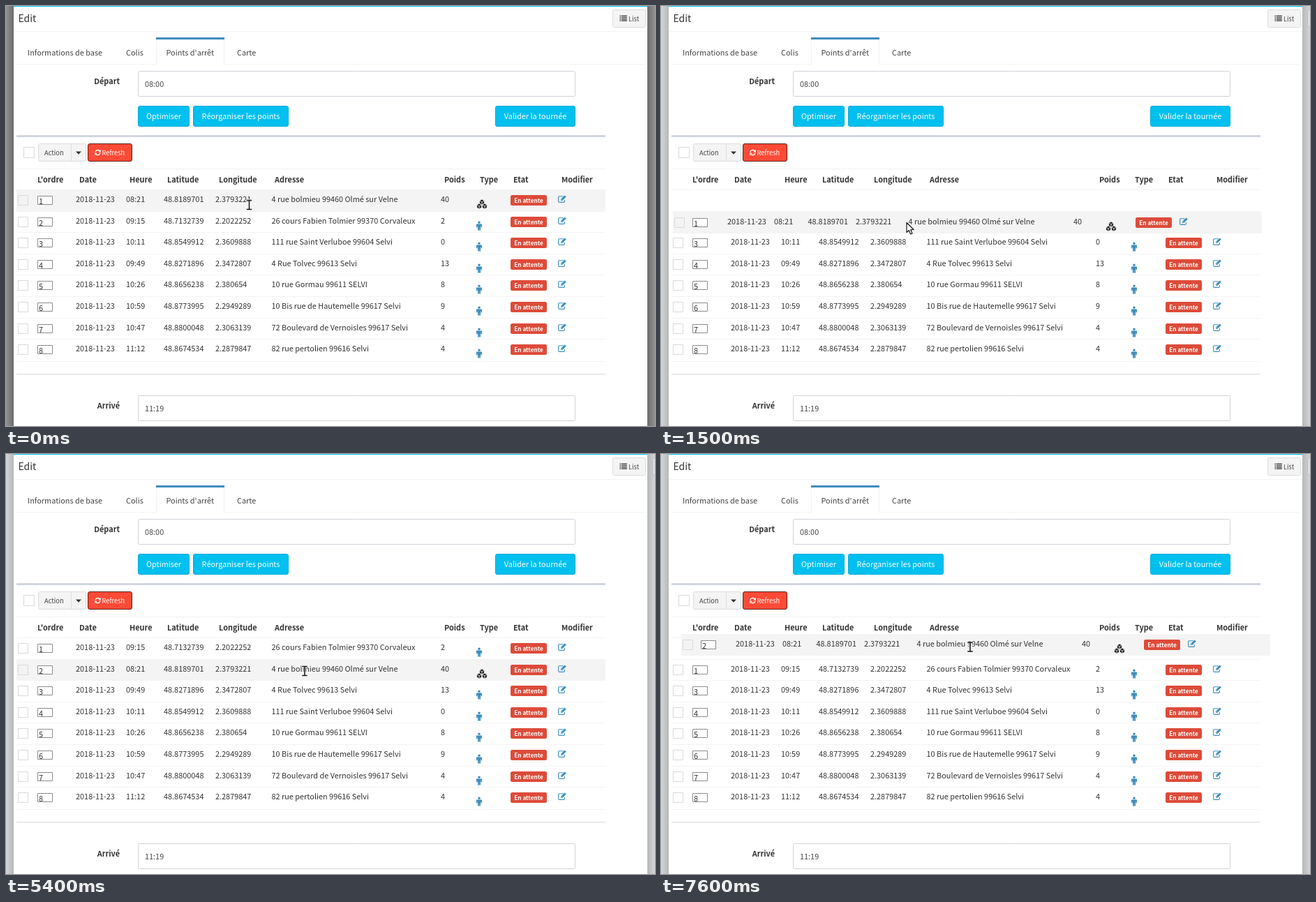
Recreate the animation shown at these times as an HTML page with a canvas. Size 930x602 px, loop 8000 ms.

```html
<!DOCTYPE html>
<html lang="fr">
<head>
<meta charset="utf-8">
<title>Points d'arrêt</title>
<style>
html, body { margin: 0; width: 100%; height: 100%; overflow: hidden; background: #fff; }
canvas { display: block; }
</style>
</head>
<body>
<canvas id="stage" width="930" height="602"></canvas>
<script>
const ctx = document.getElementById('stage').getContext('2d', { alpha: false });
const LOOP = 8000, ROW_TOP = 263, ROW_PITCH = 30.6, ROW_H = 31;
const FAMILY = '"Noto Sans CJK JP", "Noto Sans CJK SC", "Noto Sans CJK TC", "Noto Sans CJK KR", "Noto Sans CJK", "Noto Sans", sans-serif';
const BASE = 10.9, SMALL = 9.3, BLUE = '#3c8dbc', CYAN = '#00c0ef';

const stops = {
  A: ['08:21', '48.8189701', '2.3793221', '4 rue bolmieu 99460 Olmé sur Velne', '40'],
  B: ['09:15', '48.7132739', '2.2022252', '26 cours Fabien Tolmier 99370 Corvaleux', '2'],
  C: ['10:11', '48.8549912', '2.3609888', '111 rue Saint Verluboe 99604 Selvi', '0'],
  D: ['09:49', '48.8271896', '2.3472807', '4 Rue Tolvec 99613 Selvi', '13'],
  E: ['10:26', '48.8656238', '2.380654', '10 rue Gormau 99611 SELVI', '8'],
  F: ['10:59', '48.8773995', '2.2949289', '10 Bis rue de Hautemelle 99617 Selvi', '9'],
  G: ['10:47', '48.8800048', '2.3063139', '72 Boulevard de Vernoisles 99617 Selvi', '4'],
  H: ['11:12', '48.8674534', '2.2879847', '82 rue pertolien 99616 Selvi', '4']
};

// Column positions: order, date, time, latitude, longitude, address, weight, type, state, edit
const fixedCols = [45, 100, 172, 226, 300, 380.5, 623, 674, 723, 791];
const dragCols = [43, 93, 160, 208.5, 277, 352.5, 589, 635, 678, 741];

// When the order changes, and the numbering shown in the inputs
const orders = [
  [0, 'ABCDEFGH', 'ABCDEFGH'],
  [1600, 'BACDEFGH', 'ABCDEFGH'],
  [2000, 'BACDEFGH', 'BACDEFGH'],
  [4400, 'BADCEFGH', 'BACDEFGH'],
  [4600, 'BADCEFGH', 'BADCEFGH'],
  [7200, 'ABDCEFGH', 'BADCEFGH']
];

// Row being carried: start, end, row, grab point
const drags = [
  [600, 2000, 'A', 350, 16],
  [4400, 4600, 'C', 357.5, 13],
  [6000, 8000, 'A', 426, 15.5]
];

// Pointer: time, shape, x, y
const pointers = [
  [0, 'beam', 348.5, 285], [200, 'beam', 351.5, 281.5], [400, 'beam', 351.5, 279.5],
  [600, 'arrow', 350, 281], [900, 'arrow', 348, 288], [1500, 'arrow', 351.5, 310.5],
  [1600, 'arrow', 352, 312], [2200, 'arrow', 353, 317], [2300, 'arrow', 354, 322],
  [2400, 'arrow', 355, 326], [2500, 'arrow', 355, 328], [4400, 'beam', 367.5, 379],
  [4600, 'arrow', 364.5, 376], [4800, 'beam', 433.5, 364.5], [5000, 'beam', 433.5, 339.5],
  [5200, 'beam', 440.5, 331.5], [5400, 'beam', 428, 311], [6000, 'beam', 428, 308],
  [6300, 'beam', 422, 304], [6800, 'beam', 418, 298], [7200, 'beam', 435, 273],
  [7600, 'beam', 440, 273]
];

const latest = (list, t) => list.filter(e => e[0] <= t).pop();
const slotTop = i => Math.round(ROW_TOP + ROW_PITCH * i);

function pointerAt(t) {
  const now = latest(pointers, t);
  if (t < 600 || t >= 1500) return now;
  const next = pointers[pointers.indexOf(now) + 1];
  const k = (Math.floor(t / 100) * 100 - now[0]) / (next[0] - now[0]);
  return [t, now[1], now[2] + (next[2] - now[2]) * k, now[3] + (next[3] - now[3]) * k];
}

function text(str, x, y, { size = BASE, bold = false, color = '#333', align = 'left' } = {}) {
  ctx.font = `${bold ? 700 : 400} ${size}px ${FAMILY}`;
  ctx.fillStyle = color;
  ctx.textAlign = align;
  ctx.fillText(str, x, y);
}

function rect(x, y, w, h, color) {
  ctx.fillStyle = color;
  ctx.fillRect(x, y, w, h);
}

function box(x, y, w, h, fill, border, radius = 0) {
  ctx.beginPath();
  ctx.roundRect(x + .5, y + .5, w - 1, h - 1, radius);
  ctx.fillStyle = fill;
  ctx.fill();
  ctx.lineWidth = 1;
  ctx.strokeStyle = border;
  ctx.stroke();
}

function poly(points, fill, stroke, width = 1) {
  ctx.beginPath();
  points.forEach(([x, y]) => ctx.lineTo(x, y));
  ctx.closePath();
  if (fill) { ctx.fillStyle = fill; ctx.fill(); }
  if (stroke) { ctx.strokeStyle = stroke; ctx.lineWidth = width; ctx.stroke(); }
}

function at(x, y, draw) {
  ctx.save();
  ctx.translate(x, y);
  draw();
  ctx.restore();
}

function person(x, y) {
  at(x, y, () => {
    ctx.fillStyle = BLUE;
    ctx.beginPath();
    ctx.arc(4, 1.8, 1.8, 0, Math.PI * 2);
    ctx.roundRect(0, 4, 8, 2.4, 1.2);
    ctx.roundRect(0, 4, 1.6, 5, .8);
    ctx.roundRect(6.4, 4, 1.6, 5, .8);
    ctx.rect(2, 4, 4, 5);
    ctx.roundRect(2, 8, 1.8, 5.2, .7);
    ctx.roundRect(4.2, 8, 1.8, 5.2, .7);
    ctx.fill();
  });
}

function cube(x, y, back) {
  const corner = (a, r = 4) => [x + r * Math.sin(a * Math.PI / 3), y - r * Math.cos(a * Math.PI / 3)];
  poly([0, 1, 2, 3, 4, 5].map(a => corner(a)), '#222', back, .8);
  ctx.beginPath();
  [1, 3, 5].forEach(a => { ctx.moveTo(x, y); ctx.lineTo(...corner(a, 3.3)); });
  ctx.strokeStyle = back;
  ctx.lineWidth = .8;
  ctx.stroke();
}

function cubes(x, y, back) {
  cube(x + 8, y + 4, back);
  cube(x + 4.1, y + 10, back);
  cube(x + 11.9, y + 10, back);
}

function editIcon(x, y) {
  at(x, y, () => {
    ctx.strokeStyle = BLUE;
    ctx.lineWidth = 1.1;
    ctx.beginPath();
    ctx.moveTo(7.5, 1.8);
    ctx.lineTo(2, 1.8);
    ctx.quadraticCurveTo(.6, 1.8, .6, 3.2);
    ctx.lineTo(.6, 9);
    ctx.quadraticCurveTo(.6, 10.4, 2, 10.4);
    ctx.lineTo(8, 10.4);
    ctx.quadraticCurveTo(9.4, 10.4, 9.4, 9);
    ctx.lineTo(9.4, 7);
    ctx.stroke();
    poly([[4, 8], [4.2, 5.8], [9.6, .4], [11.8, 2.4], [6.2, 8]], BLUE);
    rect(4.8, 6.4, 1, 1, '#fff');
  });
}

function refreshIcon(x, y) {
  ctx.strokeStyle = '#fff';
  ctx.lineWidth = 1.4;
  [0, Math.PI].forEach(turn => at(x, y, () => {
    ctx.rotate(turn);
    ctx.beginPath();
    ctx.arc(0, 0, 3.5, Math.PI * 1.05, Math.PI * 1.8);
    ctx.stroke();
    poly([[4.4, -4.2], [4.4, -.6], [.9, -.6]], '#fff');
  }));
}

function listIcon(x, y) {
  for (let i = 0; i < 4; i++) {
    rect(x, y + i * 2.3, 1.6, 1.4, '#444');
    rect(x + 2.4, y + i * 2.3, 8, 1.4, '#444');
  }
}

function button(label, x, w) {
  box(x, 143, w, 30, CYAN, '#00acd6', 2.5);
  text(label, x + w / 2, 162, { color: '#fff', align: 'center' });
}

function field(label, value, y) {
  text(label, 163, y + 19, { bold: true, align: 'right' });
  box(189, y, 627, 37, '#fff', '#d0d3da', 2);
  text(value, 199, y + 22.5, { color: '#444' });
}

function tableRow(id, number, dx, y, cols, back) {
  const [order, date, hour, lat, lng, address, weight, type, state, edit] = cols.map(c => c + dx);
  const [time, latitude, longitude, street, kg] = stops[id];
  rect(15 + dx, y, 844, ROW_H, back);
  box(17 + dx, y + 8, 15, 15, back === '#fff' ? '#fff' : '#f3f3f3', '#d9dadc');
  box(order, y + 9, 22, 13, '#fff', '#8c8c8c');
  text(number, order + 2, y + 20.5);
  const base = y + 18;
  text('2018-11-23', date, base);
  text(time, hour, base);
  text(latitude, lat, base);
  text(longitude, lng, base);
  text(street, address, base);
  text(kg, weight, base);
  if (id === 'A') cubes(type, y + 14, back);
  else person(type, y + 14.5);
  ctx.beginPath();
  ctx.roundRect(state, y + 8, 52, 15, 2.5);
  ctx.fillStyle = '#dd4b39';
  ctx.fill();
  text('En attente', state + 26, y + 18.5, { size: 8.2, bold: true, color: '#fff', align: 'center' });
  editIcon(edit, y + 8);
}

function surroundings(t) {
  const k = Math.max(0, Math.min(1, (Math.floor(t / 100) - 5) / 9));
  const light = 1 - (1 - k) ** 3;
  const grey = (a, b) => {
    const v = Math.round(a + (b - a) * light);
    return `rgb(${v}, ${v + Math.round(2 * light)}, ${v + Math.round(4 * light)})`;
  };
  const far = grey(146, 211), near = grey(108, 181);
  [[0, 11], [930, 919]].forEach(([outer, inner]) => {
    const g = ctx.createLinearGradient(outer, 0, inner, 0);
    g.addColorStop(0, far);
    g.addColorStop(1, near);
    rect(Math.min(outer, inner), 0, 11, 602, g);
  });
  ctx.globalAlpha = light;
  box(926, 5, 20, 26, '#dcdee0', '#b9bbbe', 2.5);
  ctx.globalAlpha = 1;
  rect(11, 0, 908, 602, '#fff');
  rect(11, 0, 908, 1, CYAN);
}

function panel() {
  text('Edit', 17.5, 22.5, { size: 14 });
  rect(11, 36, 908, 1, '#f4f4f4');
  box(869, 5, 48, 26, '#f4f4f4', '#ddd', 2.5);
  listIcon(879.5, 13.5);
  text('List', 892, 22, { size: SMALL, color: '#444' });

  rect(15, 83, 900, 1, '#f4f4f4');
  rect(215, 48, 98, 36, '#fff');
  rect(215, 48, 1, 36, '#f0f0f0');
  rect(312, 48, 1, 36, '#f0f0f0');
  rect(215, 45, 98, 3, BLUE);
  [['Informations de base', 31], ['Colis', 172], ["Points d'arrêt", 229.5], ['Carte', 331]]
    .forEach(([label, x]) => text(label, x, 71, { color: '#444' }));

  field('Départ', '08:00', 93);
  button('Optimiser', 189, 74);
  button('Réorganiser les points', 268, 137);
  button('Valider la tournée', 701, 115);

  rect(15, 185, 844, 3, '#d2d6de');
  rect(15, 527, 844, 1, '#e2e2e2');
  rect(15, 528, 844, 1, '#f3f3f3');
  box(25, 202, 16, 16, '#fff', '#d9dadc');
  box(46, 197, 69, 26, '#f4f4f4', '#ddd', 2.5);
  rect(93, 197, 1, 26, '#ddd');
  text('Action', 55, 214, { size: SMALL, color: '#444' });
  poly([[100, 208.5], [108, 208.5], [104, 212.8]], '#333');
  box(117, 197, 64, 26, '#ff4a36', '#5c211a', 2.5);
  refreshIcon(131.5, 210);
  text('Refresh', 137.5, 214, { size: SMALL, color: '#fff' });

  rect(15, 233, 844, 1, '#f4f4f4');
  [["L'ordre", 45], ['Date', 105], ['Heure', 177], ['Latitude', 231], ['Longitude', 305], ['Adresse', 385],
    ['Poids', 628], ['Type', 679], ['Etat', 727], ['Modifier', 796]]
    .forEach(([label, x]) => text(label, x, 253, { bold: true }));
  field('Arrivé', '11:19', 558);
}

function pointer([, shape, x, y]) {
  at(x, y, () => {
    if (shape === 'arrow') {
      ctx.lineJoin = 'round';
      poly([[.5, 0], [.5, 14], [3.8, 11], [6.2, 16.5], [8.6, 15.4], [6.3, 10.2], [10.6, 10]], '#fff', '#1a1a1a', 1.2);
      return;
    }
    const beam = () => {
      ctx.beginPath();
      ctx.moveTo(-3, -6.5); ctx.lineTo(3, -6.5);
      ctx.moveTo(-3, 6.5); ctx.lineTo(3, 6.5);
      ctx.moveTo(0, -6.5); ctx.lineTo(0, 6.5);
      ctx.stroke();
    };
    ctx.lineCap = 'square';
    ctx.strokeStyle = '#fff';
    ctx.lineWidth = 2.8;
    beam();
    ctx.strokeStyle = '#111';
    ctx.lineWidth = 1.5;
    beam();
  });
}

function draw(t) {
  const [, order, numbering] = latest(orders, t);
  const drag = drags.find(d => t >= d[0] && t < d[1]);
  const mouse = pointerAt(t);
  const hover = drag ? -1 : Math.floor((mouse[3] - ROW_TOP) / ROW_PITCH);
  const number = id => String(numbering.indexOf(id) + 1);

  surroundings(t);
  panel();
  [...order].forEach((id, i) => {
    const y = slotTop(i);
    if (!drag || id !== drag[2]) tableRow(id, number(id), 0, y, fixedCols, i === hover ? '#f4f4f4' : '#fff');
    rect(15, y, 844, 1, '#f4f4f4');
  });
  rect(15, slotTop(8) + 1, 844, 1, '#f4f4f4');
  if (drag) {
    const [, , id, grabX, grabY] = drag;
    tableRow(id, number(id), Math.round(mouse[2] - grabX), Math.round(mouse[3] - grabY), dragCols, '#f4f4f4');
  }
  pointer(t >= 7200 ? [t, 'beam', mouse[2] + 3, mouse[3] + 3.5] : mouse);
}

function tick() {
  draw(performance.now() % LOOP);
  requestAnimationFrame(tick);
}
tick();
</script>
</body>
</html>
```
